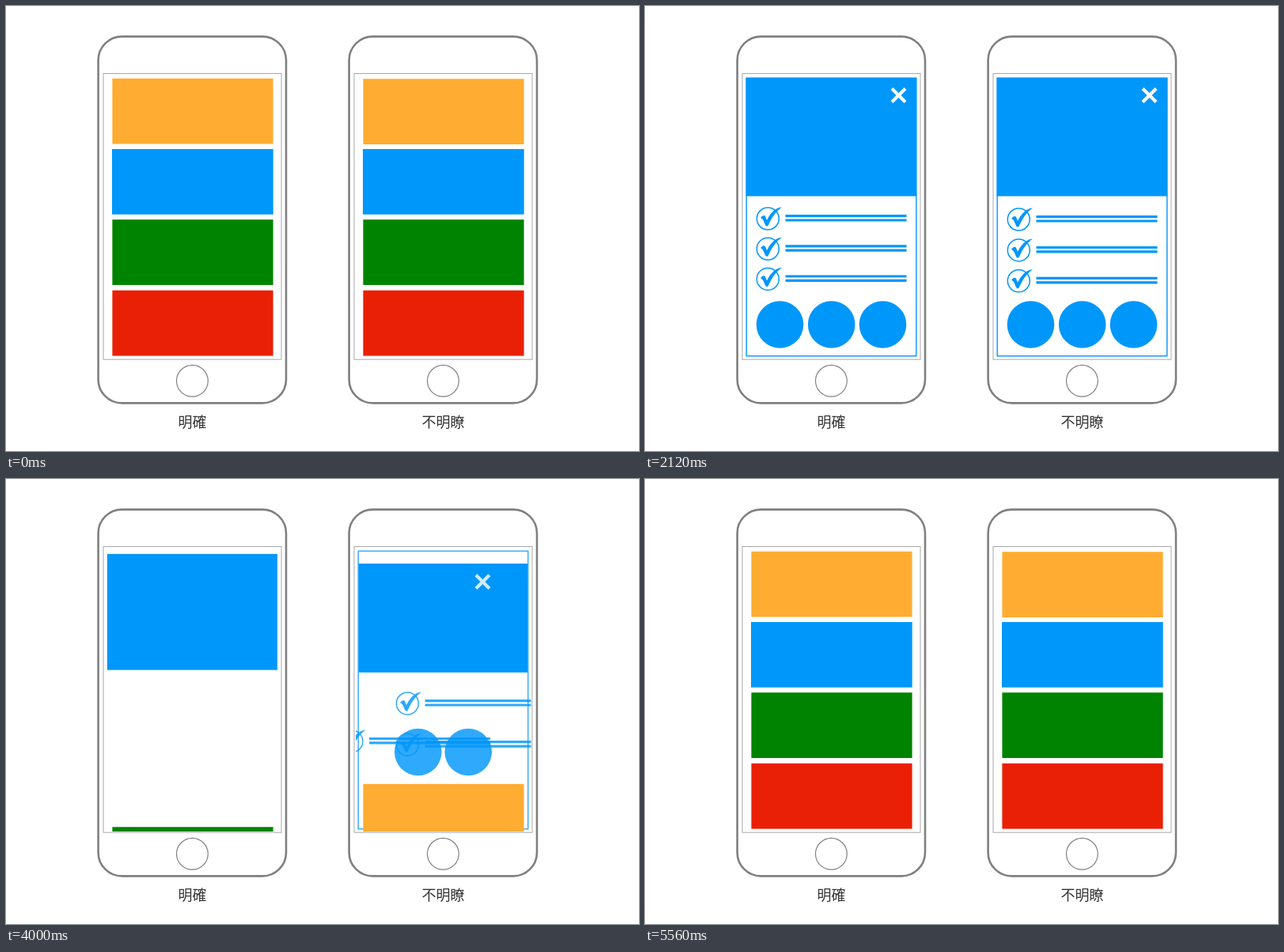
These frames come from a looping animation (800x563 px, 6.04 s). An HTML page:

```html
<!DOCTYPE html>
<html lang="zh-Hant">
<head>
<meta charset="utf-8">
<title>明確 / 不明瞭</title>
<style>
  html, body { margin: 0; width: 100%; height: 100%; overflow: hidden; background: #fff; }
  svg { display: block; width: 100vw; height: 100vh; }
  text { font: 18px "Noto Sans CJK TC", "Noto Sans CJK JP", "Noto Sans CJK", sans-serif; fill: #333; text-anchor: middle; }
</style>
</head>
<body>
<svg id="stage" viewBox="0 0 800 563">
  <defs>
    <clipPath id="screen"><rect x="125" y="88" width="221.5" height="358"/></clipPath>
    <g id="row">
      <circle cx="155.3" cy="0.7" r="14" fill="none" stroke="#0097fb" stroke-width="1.5"/>
      <path transform="translate(155 .7)" fill="#0097fb"
        d="M-9-1C-7-4-4-5-3-3L-1 2C3-6 9-14 18-14.5C11-10 5-1 1 8C0 10-2 10-3 8C-5 3-6 0-9-1Z"/>
      <path d="M177.5-2.7H330.5M177.5 2.7H330.5" stroke="#0097fb" stroke-width="3.2"/>
    </g>
    <path id="cross" d="M312 104.5L329 121.5M329 104.5L312 121.5" stroke="#fff" stroke-width="4.2"/>
    <g id="phone" fill="none" stroke="#808080">
      <rect x="116.6" y="38.6" width="237.4" height="463.8" rx="30" stroke-width="2.6"/>
      <rect x="123" y="85.5" width="225" height="361.7" stroke="#a8a8a8"/>
      <circle cx="235.4" cy="474.3" r="19.9" stroke-width="1.2"/>
    </g>
  </defs>
</svg>
<script>
const LOOP = 6040, STEP = 40;
const BLUE = '#0097fb', ORANGE = '#ffac32', GREEN = '#008300', RED = '#ea2006';
const CYCLES = [{ open: 946, close: 2361 }, { open: 3826, close: 5037 }];
const RIGHT = 317;
const stage = document.getElementById('stage');

function add(parent, tag, attrs) {
  const node = document.createElementNS('http://www.w3.org/2000/svg', tag);
  set(node, attrs);
  parent.appendChild(node);
  return node;
}
function set(node, attrs) {
  for (const key in attrs) node.setAttribute(key, attrs[key]);
}
function place(node, x, y, opacity = 1) {
  set(node, { transform: `translate(${x} ${y})`, opacity });
}

function makePhone(offset, label) {
  const phone = add(stage, 'g', { transform: `translate(${offset} 0)` });
  add(phone, 'use', { href: '#phone' });
  add(phone, 'text', { x: 235.5, y: 533 }).textContent = label;
  return add(phone, 'g', { 'clip-path': 'url(#screen)' });
}
const block = (parent, y, fill) =>
  add(parent, 'rect', { x: 134.4, y, width: 203.2, height: 82.8, fill });
const frame = parent => add(parent, 'rect', {
  x: 128.2, y: 91.2, width: 214.6, height: 351.6, fill: 'none', stroke: BLUE, 'stroke-width': 1.4
});
const makeRows = parent => [0, 1, 2].map(() => add(parent, 'use', { href: '#row' }));
const makeDots = parent => [170.5, 235.7, 300.5].map(cx =>
  add(parent, 'circle', { cx, cy: 403, r: 29.8, fill: BLUE }));

function makeClear() {
  const g = makePhone(0, '明確');
  return {
    frame: frame(g),
    orange: block(g, 91.7, ORANGE), green: block(g, 270.2, GREEN), red: block(g, 359.8, RED),
    blue: add(g, 'rect', { fill: BLUE }),
    rows: makeRows(g), dots: makeDots(g), cross: add(g, 'use', { href: '#cross' })
  };
}
function makeUnclear() {
  const g = makePhone(RIGHT, '不明瞭');
  const parts = { frame: frame(g), red: block(g, 359.8, RED), green: block(g, 270.2, GREEN) };
  parts.rows = makeRows(g);
  parts.dots = makeDots(g);
  parts.blue = add(g, 'rect', { fill: BLUE });
  parts.cross = add(g, 'use', { href: '#cross' });
  parts.orange = block(g, 92.2, ORANGE);
  return parts;
}
const clear = makeClear(), unclear = makeUnclear();

const clamp = v => Math.min(1, Math.max(0, v));
const mix = (a, b, p) => a + (b - a) * p;
function ease(v) {
  const t = clamp(v);
  return t < .5 ? 4 * t ** 3 : 1 - 4 * (1 - t) ** 3;
}

// 0 = list of blocks, 1 = detail card
function openness(t, cycle, openTime, closeTime) {
  return t < cycle.close
    ? ease((t - cycle.open) / openTime)
    : 1 - ease((t - cycle.close) / closeTime);
}
function drawBlue(node, p) {
  const x = mix(134, 127.6, p), y = mix(181, 90.8, p);
  set(node, { x, y, width: mix(203.7, 215.6, p), height: mix(263.7, 240.6, p) - y });
}

function drawClear(t, cycle) {
  const p = openness(t, cycle, 224, 440), q = 1 - p;
  const closing = t >= cycle.close, since = t - cycle.open;
  const fade = delay => closing ? p : clamp((since - delay) / 150);
  const lift = closing ? q : 0;
  drawBlue(clear.blue, p);
  place(clear.orange, 0, -97 * p);
  place(clear.green, 0, 178 * p);
  place(clear.red, 0, 178 * p);
  place(clear.frame, 0, 0, closing ? clamp(1 - 3 * q) : fade(200));
  place(clear.cross, 0, 0, fade(230));
  clear.rows.forEach((row, i) =>
    place(row, 0, 268.3 + 38.2 * i - (10 + 7 * i) * lift, fade(270 + 90 * i)));
  clear.dots.forEach(dot => place(dot, 0, -26 * lift, fade(569)));
}

const ROW_DRIFT = [[195, 78], [-197, 128], [195, -65]];
const DOT_DRIFT = [[185, -320], [115, 100], [-185, -320]];

function drawUnclear(t, cycle) {
  const p = openness(t, cycle, 270, 480), q = 1 - p;
  const closing = t >= cycle.close;
  const greenP = closing ? p : openness(t - 40, cycle, 270, 480);
  drawBlue(unclear.blue, p);
  place(unclear.orange, 0, 358 * p);
  place(unclear.green, 0, -267 * greenP);
  place(unclear.red, 0, 179 * p);
  place(unclear.frame, 0, 0, p);
  place(unclear.cross, -195 * q, 95 * q, p);
  unclear.rows.forEach((row, i) => {
    const [dx, dy] = ROW_DRIFT[i];
    place(row, dx * q, 269.3 + 38.9 * i + dy * q, p);
  });
  unclear.dots.forEach((dot, i) => {
    const [dx, dy] = DOT_DRIFT[i];
    place(dot, dx * q, dy * q, closing ? clamp(p * 8) : p);
  });
}

function draw() {
  const t = Math.floor(performance.now() % LOOP / STEP) * STEP;
  const cycle = t < 3500 ? CYCLES[0] : CYCLES[1];
  drawClear(t, cycle);
  drawUnclear(t, cycle);
  requestAnimationFrame(draw);
}
draw();
</script>
</body>
</html>
```
